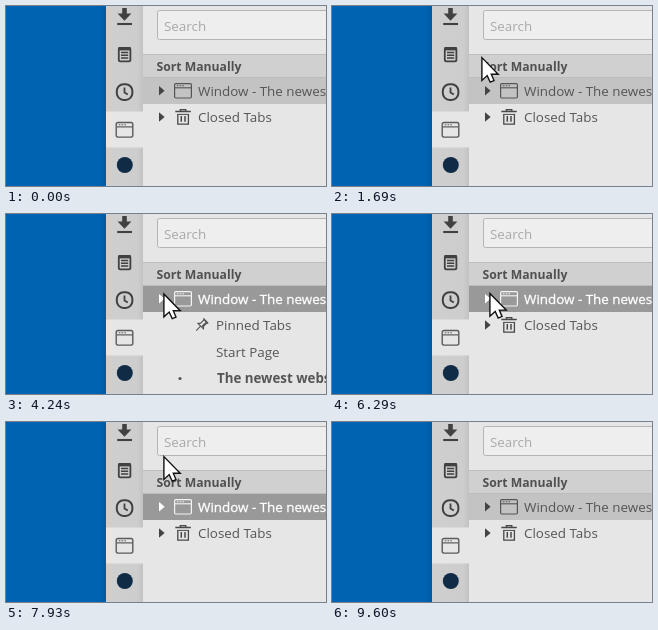
An HTML page that plays this animation: 320x180 px, repeating every 9650 ms.

```html
<!DOCTYPE html>
<html lang="en">
<head>
<meta charset="utf-8">
<title>Window panel</title>
<style>
  html, body { margin: 0; width: 100%; height: 100%; overflow: hidden; background: #0063b1; }
  svg { display: block; width: 100vw; height: 100vh; }
  text { font: 13.4px "Open Sans", "Noto Sans", sans-serif; fill: #555; white-space: pre; }
  .bold { font-weight: 700; font-size: 13.3px; }
  .line { fill: none; stroke: currentColor; }
</style>
</head>
<body>
<svg viewBox="0 0 320 180" xmlns="http://www.w3.org/2000/svg">
  <defs>
    <linearGradient id="shade">
      <stop offset="0" stop-color="#002850" stop-opacity="0"/>
      <stop offset="1" stop-color="#002850" stop-opacity=".16"/>
    </linearGradient>
    <linearGradient id="bar">
      <stop offset="0" stop-color="#cfcfcf"/>
      <stop offset=".85" stop-color="#cdcdcd"/>
      <stop offset="1" stop-color="#c2c2c2"/>
    </linearGradient>
    <g id="window" class="line">
      <rect x=".6" y=".6" width="16.8" height="14.4" rx="1.2" stroke-width="1.2"/>
      <path d="M1 4.8H17" stroke-width="1.1"/>
      <path d="M2.8 2.8H4.4M5.6 2.8H7.2M8.4 2.8H10" stroke-width="1.1"/>
    </g>
    <path id="arrow" d="M-2.8 -4.8L2.8 0L-2.8 4.8Z"/>
  </defs>

  <rect width="320" height="180" fill="#0063b1"/>
  <rect x="93" width="7" height="180" fill="url(#shade)"/>

  <!-- Button bar -->
  <rect x="100" width="37" height="180" fill="url(#bar)"/>
  <rect x="100" y="105.5" width="37" height="36" fill="#e6e6e6"/>
  <g color="#414141" fill="#414141">
    <path d="M116.2 2H120.8V7.6H125.4L118.5 14.8L111.6 7.6H116.2Z"/>
    <path class="line" d="M111.2 18H126" stroke-width="2.1"/>
    <rect class="line" x="112.8" y="42" width="11.6" height="13.4" rx="1.6" stroke-width="1.8"/>
    <path d="M112.5 41H124.7V44.4H112.5Z"/>
    <path class="line" d="M115 46.6H122.2M115 49.2H122.2M115 51.9H122.2" stroke-width="1.5"/>
    <rect class="line" x="110.8" y="78.3" width="15.6" height="15.6" rx="6.8" stroke-width="2"/>
    <path class="line" d="M118.5 81.6V86.5L121.8 88.6" stroke-width="1.8"/>
  </g>
  <g color="#5a5a5a">
    <rect class="line" x="110.2" y="116.5" width="16.6" height="14.6" rx="1.8" stroke-width="1.4"/>
    <path class="line" d="M111 120.9H126" stroke-width="1.2"/>
    <path class="line" d="M112.7 118.8H114.3M115.5 118.8H117.1M118.3 118.8H119.9" stroke-width="1"/>
  </g>
  <circle cx="118.8" cy="159" r="8" fill="#0f2b46"/>

  <!-- Panel -->
  <rect x="137" width="183" height="180" fill="#e6e6e6"/>
  <rect x="151.5" y="4.5" width="180" height="29" rx="2" fill="#eee" stroke="#b4b4b4"/>
  <text x="158" y="25" style="fill:#a9a9a9">Search</text>
  <rect x="137" y="48" width="183" height="24" fill="#d0d0d0"/>
  <path d="M137 48.5H320M137 71.5H320" stroke="#bdbdbd"/>
  <text class="bold" x="150.5" y="64.8" style="font-size:12.2px;fill:#505050">Sort Manually</text>

  <g id="row">
    <rect id="rowBack" x="137" y="72" width="183" height="26"/>
    <use id="rowArrow" href="#arrow"/>
    <use href="#window" x="168" y="77"/>
    <text id="rowText" x="192" y="90" stroke-width=".3">Window - The newest website</text>
  </g>

  <g id="closed">
    <use href="#arrow" x="155.8" y="111" fill="#444"/>
    <g class="line" color="#484848" stroke-width="1.3">
      <path d="M169.3 105.5H184.8M174.3 105V103.6H179.8V105M171.8 108.2V118.2H182.4V108.2"/>
      <path d="M175.3 110V115.8M179 110V115.8" stroke-width="1.5"/>
      <path d="M171.1 108.4H183.1" stroke-width="1"/>
    </g>
    <text x="192" y="116.2">Closed Tabs</text>
  </g>

  <g id="tabs">
    <g transform="translate(195.8 111) rotate(45) scale(.88)" fill="#505050">
      <path class="line" color="#505050" d="M-2.4 -6.2V-.6L-4.4 1.8H4.4L2.4 -.6V-6.2Z" stroke-width="1.2"/>
      <path d="M-3.9 -7.2H3.9V-5.6H-3.9ZM.6 -6V1.5H2.2V-6ZM-.6 2H.6V9H-.6Z"/>
    </g>
    <text x="210" y="116.2">Pinned Tabs</text>
    <text x="210" y="142.6">Start Page</text>
    <circle cx="174" cy="164.5" r="1.6" fill="#555"/>
    <text class="bold" x="211" y="169">The newest website</text>
  </g>

  <path id="cursor" d="M.9 1.6V24.4L6.2 19.6L9.2 26.2L13 24.6L10.3 18.2H17.2Z"
        fill="#fff" stroke="#111" stroke-width="1.4"/>
</svg>
<script>
const LOOP = 9650, OPEN = 4160, CLOSE = 5590, BLUR = 9600, TURN = 300;
const $ = id => document.getElementById(id);

// Bursts of movement: start, last step, number of steps
const bursts = [
  [490, 1390, 10], [1490, 2390, 10], [2490, 3110, 8], [3310, 3910, 7], [4160, 4840, 8],
  [5590, 6500, 10], [6600, 7530, 11], [7630, 8530, 10], [8630, 9050, 6]
];

// Pointer path: time, x, y
const path = [
  [390, 147, -30], [1390, 146, 41], [1690, 149, 50], [2390, 155, 65],
  [2790, 155.5, 70.5], [3110, 157.5, 78], [3910, 157, 78.5], [6290, 157, 78],
  [6500, 157.5, 75], [7530, 157, 48.5], [7930, 157, 33], [8530, 159.5, -11],
  [9050, 160, -30]
];

const clamp = v => Math.min(1, Math.max(0, v));
const ease = v => v * v * (3 - 2 * v);

function stepped(t) {
  let held = 0;
  for (const [start, end, count] of bursts) {
    if (t < start) break;
    const gap = (end - start) / (count - 1);
    held = start + Math.min(count - 1, Math.floor((t - start) / gap + 0.1)) * gap;
  }
  return held;
}

function pointer(t) {
  const i = path.findIndex(p => p[0] > t);
  if (i < 0) return path[path.length - 1].slice(1);
  if (i === 0) return path[0].slice(1);
  const a = path[i - 1], b = path[i], k = (t - a[0]) / (b[0] - a[0]);
  return [a[1] + (b[1] - a[1]) * k, a[2] + (b[2] - a[2]) * k];
}

function draw(t) {
  const s = stepped(t);
  const open = t >= OPEN && t < CLOSE;
  const focused = t >= OPEN && t < BLUR;
  const turn = ease(clamp((s - OPEN) / TURN)) - ease(clamp((s - CLOSE) / TURN));
  const [x, y] = pointer(s);

  $("tabs").style.display = open ? "" : "none";
  $("closed").style.display = open ? "none" : "";
  $("rowBack").setAttribute("fill", focused ? "#999" : "#c3c3c3");
  $("row").style.color = focused ? "#f4f4f4" : "#555";
  $("rowText").style.fill = focused ? "#fff" : "#555";
  $("rowText").style.stroke = focused ? "#fff" : "none";
  $("rowArrow").setAttribute("fill", focused ? "#fff" : "#444");
  $("rowArrow").setAttribute("transform", `translate(155.8 84.7) rotate(${90 * turn})`);
  $("cursor").setAttribute("transform", `translate(${x} ${y})`);
}

function tick(now) {
  draw(now % LOOP);
  requestAnimationFrame(tick);
}
draw(0);
requestAnimationFrame(tick);
</script>
</body>
</html>
```
